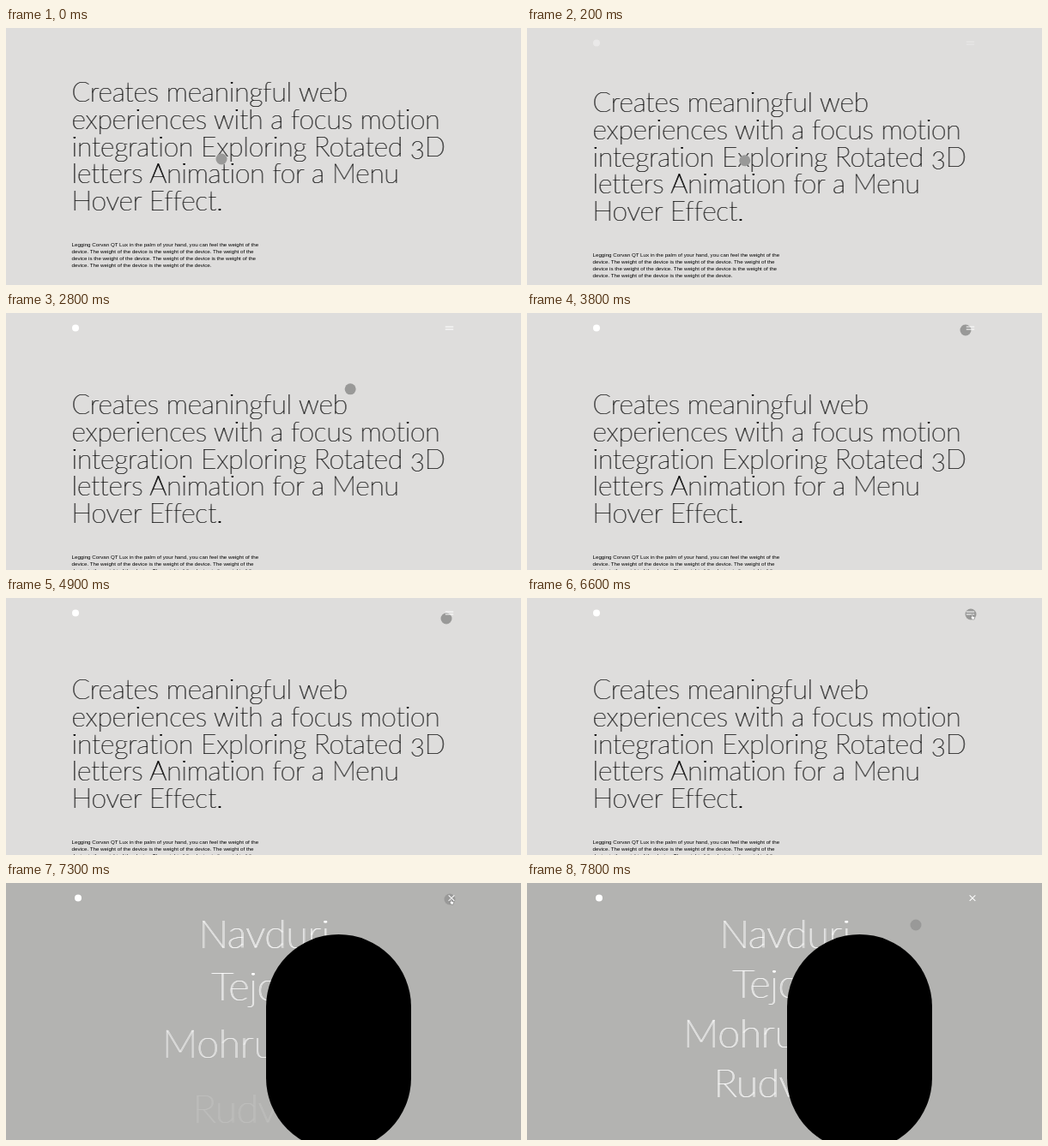
Recreate the animation shown at these times as an HTML page. Size 600 by 300 pixels, loop 8000 ms.

```html
<!DOCTYPE html>
<html lang="en">
<head>
<meta charset="utf-8">
<title>Menu hover</title>
<style>
  html, body { margin: 0; width: 100%; height: 100%; overflow: hidden; background: #dedddc; }
  svg { display: block; width: 600px; height: 300px; }
  /* the sideways shadow thickens upright strokes only */
  .display { font-family: Lato, sans-serif; font-weight: 100; font-feature-settings: "onum"; }
  #title { font-size: 31.8px; letter-spacing: -.2px; text-shadow: .5px 0 #000, 1px 0 #000; }
  #names { font-size: 46px; fill: #fff; text-anchor: middle; text-shadow: .8px 0 #fff, 1.6px 0 #fff; }
  #body { font: 6.2px "Liberation Sans", Arial, sans-serif; }
</style>
</head>
<body>
<svg viewBox="0 0 600 300">
  <g id="page">
    <g id="title" class="display"></g>
    <g id="body"></g>
  </g>
  <g id="menu">
    <rect width="600" height="300" fill="#b3b3b1"/>
    <g id="names" class="display"></g>
    <rect x="303" y="60" width="169" height="252" rx="84.5"/>
  </g>
  <circle id="cursor" r="6.5" fill="#999998"/>
  <g id="header">
    <circle id="logo" cy="17.5" r="4" fill="#fff"/>
    <g stroke="#fff">
      <path id="bar1" d="M-4.7 0H4.7"/>
      <path id="bar2" d="M-4.7 0H4.7"/>
    </g>
  </g>
  <path id="hand" fill="#fff" stroke="#555" stroke-width=".4"
        d="M518 19.2q.6-.7 1.1 0v2l2.2.5q.5.2.4.9l-.5 2.4h-2.6l-1.9-2.5q.3-.8 1.3 0z"/>
</svg>
<script>
const LOOP = 8000, OPEN = 6900;
const $ = id => document.getElementById(id);
const clamp = v => Math.min(1, Math.max(0, v));
const easeOut = p => 1 - (1 - p) ** 3;
const set = (el, attrs) => { for (const k in attrs) el.setAttribute(k, attrs[k]); };

function addLines(id, x, y, pitch, lines) {
  return lines.map((line, i) => {
    const el = document.createElementNS('http://www.w3.org/2000/svg', 'text');
    set(el, { x, y: y + i * pitch });
    el.textContent = line;
    return $(id).appendChild(el);
  });
}

addLines('title', 76, 118, 31.8, [
  'Creates meaningful web',
  'experiences with a focus motion',
  'integration Exploring Rotated 3D',
  'letters Animation for a Menu',
  'Hover Effect.'
]);
addLines('body', 76.5, 286.7, 8.15, [
  'Legging Corvan QT Lux in the palm of your hand, you can feel the weight of the',
  'device. The weight of the device is the weight of the device. The weight of the',
  'device is the weight of the device. The weight of the device is the weight of the',
  'device is the weight of the device.'
].map((line, i) => i < 3 ? line : 'device. The weight of the device is the weight of the device.'));
const names = addLines('names', 300, 76, 58, ['Navduri', 'Tejolin', 'Mohruvatan', 'Rudvesh']);

// time, x, y
const path = [
  [0, 251, 153], [800, 262, 160], [1300, 287, 180], [1600, 325, 164], [2000, 401, 129],
  [2500, 401, 124], [2800, 401, 89], [3100, 445, 46], [3400, 473, 32], [3800, 511, 20],
  [4400, 512, 24], [4900, 513, 24], [5300, 513.5, 25], [5700, 514, 24.5], [6600, 517, 19],
  [7400, 517, 19], [7600, 500, 26], [7800, 453, 49], [8000, 453, 49]
];

function cursorAt(t) {
  const i = path.findIndex(p => p[0] > t);
  const [t0, x0, y0] = path[i - 1], [t1, x1, y1] = path[i];
  const p = (t - t0) / (t1 - t0);
  return { cx: x0 + (x1 - x0) * p, cy: y0 + (y1 - y0) * p };
}

function draw(now) {
  const t = now % LOOP, open = t >= OPEN;
  const scroll = easeOut(clamp((t - 100) / 700));
  set($('page'), { transform: `translate(0 ${-32 * (1 - scroll)})` });
  set($('header'), { opacity: scroll });
  set($('menu'), { visibility: open ? 'visible' : 'hidden' });
  set($('cursor'), cursorAt(t));
  set($('hand'), { visibility: t > 6100 && t < 7450 ? 'visible' : 'hidden' });

  const turn = open ? easeOut(clamp((t - 6750) / 350)) : 0;
  const x = open ? 519 : 516.5, gap = 1.5 * (1 - turn);
  set($('logo'), { cx: open ? 84 : 81 });
  set($('bar1'), { transform: `translate(${x} ${17.6 - gap}) rotate(${45 * turn})` });
  set($('bar2'), { transform: `translate(${x} ${17.6 + gap}) rotate(${-45 * turn})` });

  names.forEach((el, i) => {
    const p = clamp((t - 6720 - i * 180) / 700);
    set(el, { transform: `translate(0 ${36 * (1 - easeOut(p))})`, opacity: clamp(p * 2.8) });
  });
}

function frame(now) {
  draw(now);
  requestAnimationFrame(frame);
}
draw(0);
requestAnimationFrame(frame);
</script>
</body>
</html>
```
